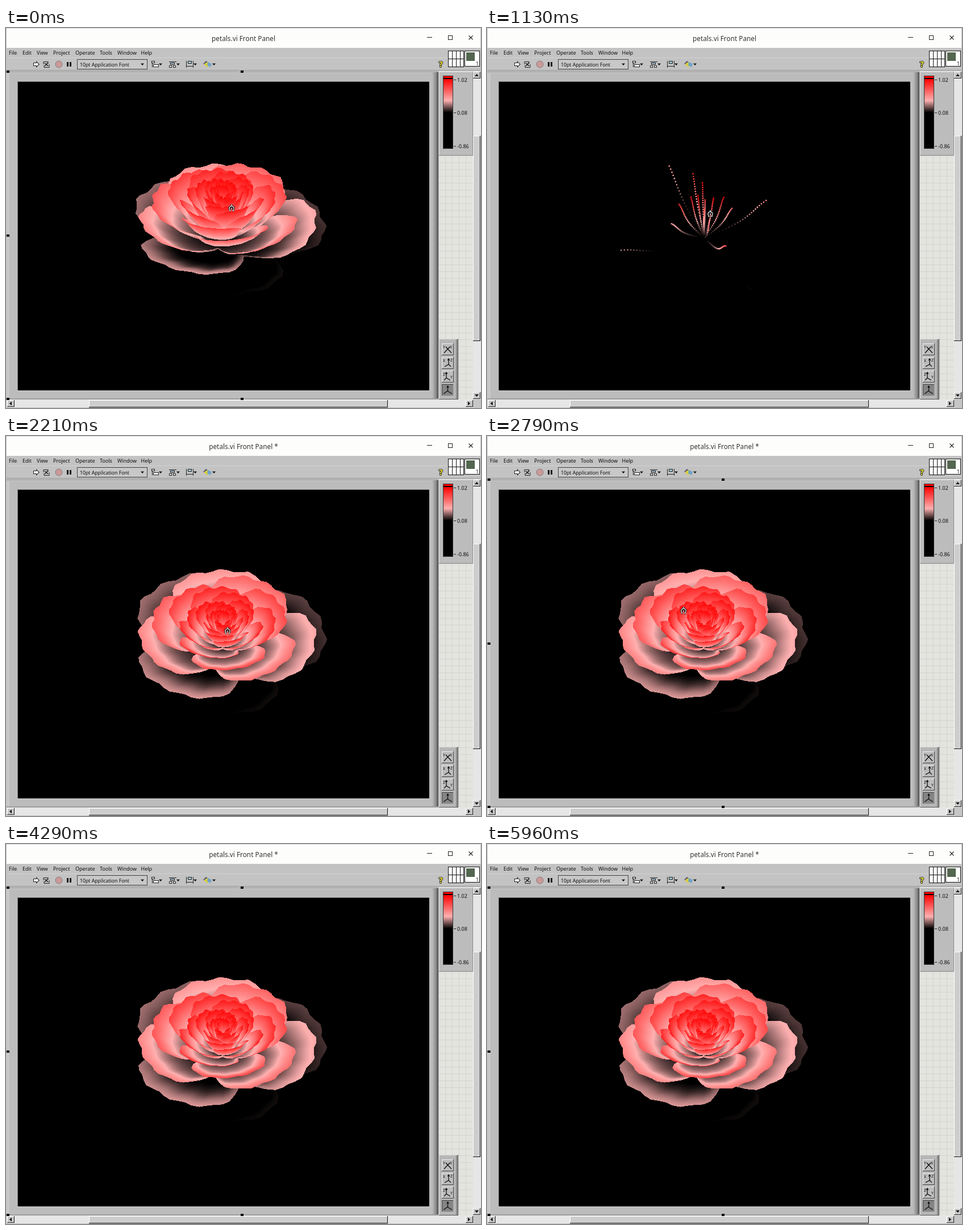
An HTML page with a canvas for the animation above (6 s loop, 836 by 670 pixels).

```html
<!DOCTYPE html>
<html lang="en">
<head>
<meta charset="utf-8">
<title>Front Panel</title>
<style>
html, body { margin: 0; width: 100%; height: 100%; overflow: hidden; background: #fff; }
canvas { display: block; }
</style>
</head>
<body>
<canvas id="stage" width="836" height="670"></canvas>
<script>
const LOOP = 6000, PI = Math.PI, DEG = PI / 180;
const VIEW = { x: 21, y: 95, w: 724, h: 544 };
const T0 = -4 * PI, TN = 1150, TSTEP = 30 * PI / TN, XN = 24;
const H_BLACK = 0.06, H_PINK = 0.42, H_RED = 1.02;
const FONT = '"Noto Sans", "Open Sans", sans-serif';
const DOTS_ON = 600, DOTS_OFF = 1850, HANDLES_ON = 2600;

// cursor path: time, x, y
const PATH = [
  [0, 397, 317], [750, 397, 317], [1130, 393, 327], [1290, 391.5, 335], [1500, 390, 343],
  [2560, 390, 343], [3000, 306, 275], [3220, 306, 275], [3540, 409, 379], [3790, 767, 468],
  [3900, 850, 490], [LOOP, 850, 490]
];

const stage = document.getElementById('stage').getContext('2d');

function layer(w, h) {
  const c = document.createElement('canvas');
  c.width = w;
  c.height = h;
  return c.getContext('2d');
}

function cursorAt(t) {
  const i = PATH.findIndex(k => k[0] > t);
  const [ta, xa, ya] = PATH[i - 1], [tb, xb, yb] = PATH[i];
  const k = (t - ta) / (tb - ta);
  return [xa + (xb - xa) * k, ya + (yb - ya) * k];
}

// ---- rose surface ----
function petal(x, t) {
  const p = PI / 2 * Math.exp(-t / (8 * PI));
  const c = 3.3 * t / (2 * PI), f = c - Math.floor(c);
  const u = 1 - (1 - 2 * f) ** 4 / 2 + Math.sin(20 * t) / 50;
  const y = 2 * (x * x - x) ** 2 * Math.sin(p);
  return {
    r: u * (x * Math.sin(p) + y * Math.cos(p)),
    h: u * (x * Math.cos(p) - y * Math.sin(p))
  };
}

// dragging the cursor turns the view
function projector([cx, cy]) {
  const tilt = (56.4 + (cy - 327) * 0.68) * DEG;
  const turn = (-145 + (cx - 393) * 0.62) * DEG;
  const s = Math.sin(tilt), c = Math.cos(tilt);
  return (i, j) => {
    const t = T0 + i * TSTEP, { r, h } = petal(j / XN, t);
    const side = r * Math.cos(t + turn), back = r * Math.sin(t + turn);
    return {
      x: 382.5 + 181.5 * side,
      y: 366 - 135 * (back * s + (h - 0.08) * c),
      z: h * s - back * c,
      h
    };
  };
}

function heat(h) {
  if (h <= H_BLACK) return [0, 0, 0];
  const k = (h - H_BLACK) / (H_PINK - H_BLACK);
  if (k < 1) return [255 * k, 176 * k, 176 * k];
  const g = Math.max(0, 176 * (H_RED - h) / (H_RED - H_PINK));
  return [255, g, g];
}

function renderRose(cursor) {
  const { w, h } = VIEW, g = layer(w, h), img = g.createImageData(w, h);
  const depth = new Float32Array(w * h).fill(-9), at = projector(cursor);
  for (let i = 3; i < img.data.length; i += 4) img.data[i] = 255;

  function triangle(a, b, c) {
    const area = (b.x - a.x) * (c.y - a.y) - (b.y - a.y) * (c.x - a.x);
    if (!area) return;
    const x0 = Math.ceil(Math.min(a.x, b.x, c.x)), x1 = Math.max(a.x, b.x, c.x);
    const y0 = Math.ceil(Math.min(a.y, b.y, c.y)), y1 = Math.max(a.y, b.y, c.y);
    for (let y = y0; y <= y1; y++) for (let x = x0; x <= x1; x++) {
      const wb = ((x - a.x) * (c.y - a.y) - (y - a.y) * (c.x - a.x)) / area;
      const wc = ((b.x - a.x) * (y - a.y) - (b.y - a.y) * (x - a.x)) / area;
      const wa = 1 - wb - wc;
      if (wa < 0 || wb < 0 || wc < 0) continue;
      const n = (y - VIEW.y) * w + x - VIEW.x, z = wa * a.z + wb * b.z + wc * c.z;
      if (z <= depth[n]) continue;
      depth[n] = z;
      img.data.set(heat(wa * a.h + wb * b.h + wc * c.h), n * 4);
    }
  }

  const row = i => Array.from({ length: XN + 1 }, (_, j) => at(i, j));
  for (let i = 1, prev = row(0); i <= TN; i++) {
    const next = row(i);
    for (let j = 0; j < XN; j++) {
      triangle(prev[j], prev[j + 1], next[j]);
      triangle(next[j], prev[j + 1], next[j + 1]);
    }
    prev = next;
  }
  g.putImageData(img, 0, 0);
  return g.canvas;
}

function drawDots(g, cursor) {
  const at = projector(cursor);
  for (let i = 0; i <= TN; i += 57) for (let j = 0; j <= XN; j++) {
    const p = at(i, j);
    if (p.h < H_BLACK) continue;
    g.fillStyle = `rgb(${heat(p.h).map(Math.round)})`;
    g.beginPath();
    g.arc(p.x, p.y, 1.35, 0, 2 * PI);
    g.fill();
  }
}

// ---- window ----
function rect(g, x, y, w, h, fill) {
  g.fillStyle = fill;
  g.fillRect(x, y, w, h);
}

function bevel(g, x, y, w, h, fill, light = '#f4f4f4', dark = '#555') {
  rect(g, x, y, w, h, dark);
  rect(g, x, y, w - 1, h - 1, light);
  rect(g, x + 1, y + 1, w - 2, h - 2, fill);
}

function line(g, color, width, ...pts) {
  g.strokeStyle = color;
  g.lineWidth = width;
  g.beginPath();
  for (let i = 0; i < pts.length; i += 2) g.lineTo(pts[i], pts[i + 1]);
  g.stroke();
}

function poly(g, fill, ...pts) {
  g.fillStyle = fill;
  g.beginPath();
  for (let i = 0; i < pts.length; i += 2) g.lineTo(pts[i], pts[i + 1]);
  g.closePath();
  g.fill();
}

function label(g, text, x, y, size = 9, fill = '#111', align = 'left') {
  g.font = `${size}px ${FONT}`;
  g.textAlign = align;
  g.fillStyle = fill;
  g.fillText(text, x, y);
}

function ramp(g, x0, y0, x1, y1, ...stops) {
  const f = g.createLinearGradient(x0, y0, x1, y1);
  stops.forEach(([k, c]) => f.addColorStop(k, c));
  return f;
}

function drawToolbar(g) {
  rect(g, 1, 35, 834, 41, '#c3c3c3');
  rect(g, 1, 52, 777, 1, '#d2d2d2');
  rect(g, 1, 74, 834, 1, '#999');
  const menu = { File: 5, Edit: 29, View: 54, Project: 83, Operate: 122, Tools: 165, Window: 196, Help: 237.5 };
  for (const name in menu) label(g, name, menu[name], 47);

  poly(g, '#222', 48, 61, 53, 61, 53, 58, 59, 64, 53, 70, 53, 67, 48, 67);
  poly(g, '#fff', 49, 62, 54, 62, 54, 60.5, 57.5, 64, 54, 67.5, 54, 66, 49, 66);
  line(g, '#222', 1, 66, 64, 66, 59.5, 74, 59.5, 74, 63);
  line(g, '#222', 1, 76, 64, 76, 69.5, 67, 69.5, 67, 66);
  line(g, '#222', 1.5, 68, 62, 71, 64.5, 68, 67);
  line(g, '#222', 1.5, 74, 61, 71, 64, 74, 67);
  g.fillStyle = '#c99a9a';
  g.strokeStyle = '#8b7777';
  g.lineWidth = 1;
  g.beginPath();
  g.arc(93, 64, 6, 0, 2 * PI);
  g.fill();
  g.stroke();
  rect(g, 107, 60, 3, 8, '#111');
  rect(g, 112, 60, 3, 8, '#111');

  bevel(g, 125, 55, 124, 18, '#c8c8c8', '#444', '#444');
  label(g, '10pt Application Font', 130, 68, 8.7);
  for (const x of [240, 272, 303, 333, 366]) poly(g, '#111', x - 3, 62.5, x + 3, 62.5, x, 66);
  rect(g, 256, 58, 6, 4, '#111');
  rect(g, 257, 59, 4, 2, '#eee');
  line(g, '#222', 1, 257.5, 62, 257.5, 69);
  bevel(g, 259, 64, 10, 5, '#fff', '#222', '#222');
  line(g, '#222', 1, 287, 59.5, 300, 59.5);
  bevel(g, 289, 61, 8, 4, '#9fc3d8', '#222', '#222');
  bevel(g, 287, 66, 5, 4, '#fff', '#222', '#222');
  bevel(g, 294, 66, 5, 4, '#fff', '#222', '#222');
  line(g, '#222', 1, 317.5, 58, 317.5, 70);
  line(g, '#222', 1, 329.5, 58, 329.5, 70);
  bevel(g, 320, 58, 7, 5, '#9fc3d8', '#222', '#222');
  line(g, '#222', 1, 318, 67.5, 329, 67.5);
  poly(g, '#557', 347, 63, 352, 58, 356, 61, 351, 66);
  poly(g, '#d9cf3c', 348, 64, 354, 60, 360, 64, 354, 69);
  poly(g, '#6fa3c8', 355, 60, 362, 63, 360, 69, 354, 66);
  g.lineWidth = 2;
  g.strokeStyle = '#333';
  g.font = `bold 14px ${FONT}`;
  g.strokeText('?', 762, 69);
  g.fillStyle = '#f3e530';
  g.fillText('?', 762, 69);

  bevel(g, 778, 40, 28, 29, '#fff', '#111', '#111');
  for (const x of [785, 792, 799]) rect(g, x, 41, 1, 27, '#111');
  rect(g, 779, 54, 26, 1, '#111');
  bevel(g, 807, 40, 27, 28, '#fff', '#111', '#111');
  rect(g, 810, 43, 15, 15, '#53664f');
  label(g, '1', 827, 66, 8);
}

function drawPanel(g) {
  rect(g, 1, 76, 760, 579, '#bcbcbc');
  rect(g, 1, 76, 760, 4, ramp(g, 0, 76, 0, 80, [0, '#a4a4a4'], [1, '#c8c8c8']));
  rect(g, 1, 80, 5, 574, '#c8c8c8');
  rect(g, 750, 78, 11, 577, ramp(g, 750, 0, 761, 0, [0, '#bcbcbc'], [0.6, '#8d8d8d'], [1, '#4c4c4c']));
  bevel(g, VIEW.x - 1, VIEW.y - 1, VIEW.w + 2, VIEW.h + 2, '#000', '#808080', '#ccc');
  rect(g, 1, 653, 760, 2, '#9c9c9c');

  rect(g, 762, 76, 60, 579, '#e3e3df');
  for (let x = 773; x < 821; x += 12) rect(g, x, 76, 1, 579, '#d5d5cf');
  for (let y = 81; y < 655; y += 12) rect(g, 762, y, 60, 1, '#d5d5cf');

  bevel(g, 762, 77, 60, 148, '#bcbcbc', '#d8d8d8', '#888');
  rect(g, 769, 84, 18, 129, '#333');
  rect(g, 770, 85, 16, 3, '#f00');
  rect(g, 770, 88, 16, 2, '#000');
  rect(g, 770, 90, 16, 122,
    ramp(g, 0, 90, 0, 149, [0, '#f00'], [0.64, 'rgb(255,176,176)'], [1, '#000']));
  [['1.02', 91], ['0.08', 149], ['-0.86', 208]].forEach(([s, y]) => {
    rect(g, 788, y, 4, 1, '#222');
    label(g, s, 794, y + 4);
  });

  bevel(g, 762, 548, 34, 107, '#b6b6b6', '#d8d8d8', '#555');
  rect(g, 792, 549, 3, 105, '#8c8c8c');
  for (let k = 0; k < 4; k++) drawAxisButton(g, k);
}

function drawAxisButton(g, k) {
  const x = 767, y = 556 + 24 * k, cx = x + 10, on = k === 3, ink = '#111';
  bevel(g, x, y, 21, 21, on ? '#858585' : '#bdbdbd', on ? '#444' : '#eee', on ? '#aaa' : '#444');
  if (k === 0) {
    line(g, ink, 1.3, x + 4, y + 17, cx + 4, y + 6);
    line(g, ink, 1.3, x + 17, y + 17, cx - 3, y + 6);
    label(g, 'Y', x + 2, y + 9, 7);
    label(g, 'X', x + 14, y + 9, 7);
  } else if (on) {
    line(g, ink, 1.3, x + 3, y + 17, cx, y + 12, x + 18, y + 17);
    line(g, ink, 1.3, cx + 0.5, y + 12, cx + 0.5, y + 4);
    poly(g, ink, cx - 2, y + 6, cx + 3, y + 6, cx + 0.5, y + 2);
  } else {
    const flip = k === 1 ? 1 : -1;
    label(g, k === 1 ? 'X' : 'Z', x + 2, y + 9, 7);
    label(g, k === 1 ? 'Z' : 'Y', x + 15, y + (k === 1 ? 8 : 14), 7);
    line(g, ink, 1.3, cx + 2 * flip, y + 4, cx + 2 * flip, y + 13, cx - 5 * flip, y + 17);
    poly(g, ink, cx + 2 * flip - 2.5, y + 6, cx + 2 * flip + 2.5, y + 6, cx + 2 * flip, y + 2);
    line(g, ink, 1.3, cx + 2 * flip, y + 13, cx + 6 * flip, y + 17);
  }
}

function drawScrollbars(g) {
  rect(g, 822, 76, 14, 593, '#e6e6e6');
  rect(g, 1, 655, 821, 14, '#e6e6e6');
  bevel(g, 822, 190, 13, 362, '#cdcdcd', '#fff', '#111');
  bevel(g, 146, 656, 526, 13, '#cdcdcd', '#fff', '#111');
  for (const [x, y] of [[822, 77], [822, 642], [2, 656], [809, 656]]) bevel(g, x, y, 13, 12, '#c6c6c6', '#fff', '#222');
  poly(g, '#111', 825, 85, 832, 85, 828.5, 81);
  poly(g, '#111', 825, 646, 832, 646, 828.5, 650);
  poly(g, '#111', 10, 658.5, 10, 665.5, 6, 662);
  poly(g, '#111', 813, 658.5, 813, 665.5, 817, 662);
  rect(g, 822, 655, 14, 15, '#c6c6c6');
}

function renderWindow() {
  const g = layer(836, 670);
  rect(g, 0, 0, 836, 670, '#c0c0c0');
  rect(g, 0, 0, 836, 1, '#d5d5d5');
  rect(g, 1, 1, 834, 34, '#fdfdfc');
  rect(g, 741, 16, 9, 1, '#222');
  g.strokeStyle = '#222';
  g.lineWidth = 1;
  g.strokeRect(778.5, 13.5, 7, 7);
  line(g, '#222', 1.1, 814.5, 13.5, 821.5, 20.5);
  line(g, '#222', 1.1, 821.5, 13.5, 814.5, 20.5);
  drawToolbar(g);
  drawPanel(g);
  drawScrollbars(g);
  return g.canvas;
}

function drawCursor(g, [x, y]) {
  g.save();
  g.translate(x, y);
  for (const [color, width] of [['#000', 3.2], ['#eee', 1.4]]) {
    g.strokeStyle = color;
    g.lineWidth = width;
    g.beginPath();
    g.arc(0, 1, 4, 0.75 * PI, 2.25 * PI);
    g.moveTo(0, -6);
    g.lineTo(0, 3);
    g.moveTo(-4, 5);
    g.lineTo(-1.5, 5);
    g.moveTo(4, 5);
    g.lineTo(1.5, 5);
    g.stroke();
  }
  poly(g, '#222', -2, 0, 0, -3, 2, 0);
  g.restore();
}

const ui = renderWindow();
const before = renderRose(cursorAt(0)), after = renderRose(cursorAt(DOTS_OFF));

function draw(t) {
  const cursor = cursorAt(t), edited = t >= DOTS_OFF;
  stage.drawImage(ui, 0, 0);
  label(stage, 'petals.vi Front Panel' + (edited ? ' *' : ''), 418, 22.5, 11.8, '#333', 'center');
  if (t >= DOTS_ON && !edited) drawDots(stage, cursor);
  else stage.drawImage(edited ? after : before, VIEW.x, VIEW.y);
  if (t < DOTS_ON || t >= HANDLES_ON)
    for (const [x, y] of [[1, 75], [413, 75], [1, 364], [1, 652], [413, 652]]) rect(stage, x, y, 5, 4, '#000');
  drawCursor(stage, cursor);
}

const start = performance.now();
function tick() {
  draw((performance.now() - start) % LOOP);
  requestAnimationFrame(tick);
}
tick();
</script>
</body>
</html>
```
